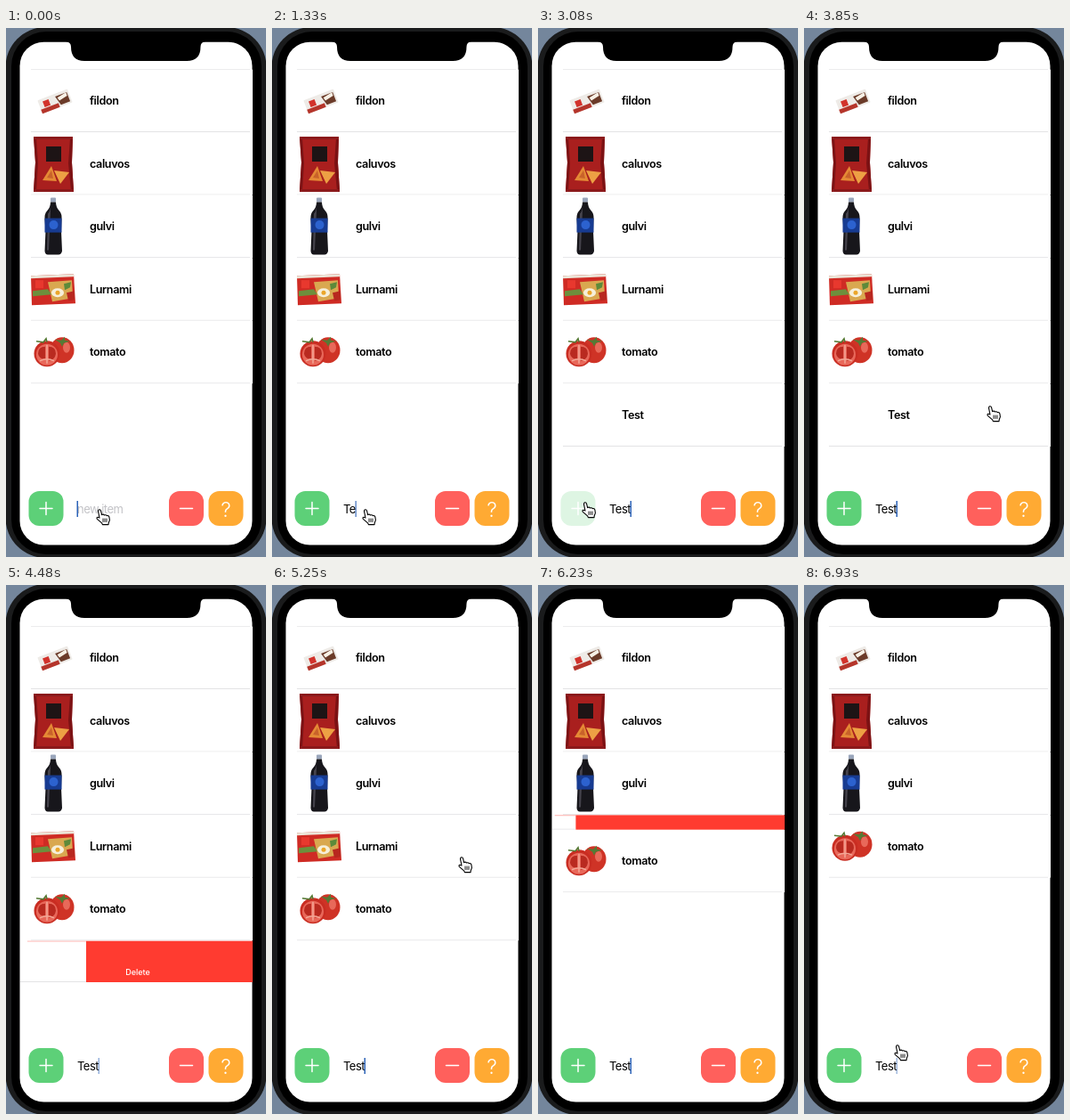
These frames come from a looping animation (292x594 px, 7000 ms). An HTML page:

```html
<!DOCTYPE html>
<html lang="en">
<head>
<meta charset="utf-8">
<title>Shopping list</title>
<style>
  html, body { margin: 0; width: 100%; height: 100%; overflow: hidden; background: #74869c; }
  svg { display: block; }
  text { font-family: Inter, "Liberation Sans", sans-serif; }
  .name { font-size: 12.6px; font-weight: 600; letter-spacing: -.03em; }
  .field { font-size: 13px; letter-spacing: -.04em; }
  .delete { font-size: 9px; font-weight: 500; fill: #fff; text-anchor: middle; }
  .icon { stroke: #fff; stroke-width: 1.5; stroke-linecap: round; fill: none; }
</style>
</head>
<body>
<svg id="stage" width="292" height="594" viewBox="0 0 292 594">
  <defs>
    <g id="bar" transform="translate(39 36) rotate(-21)">
      <rect x="-18" y="-8" width="36" height="16" rx="1" fill="#eeebe7"/>
      <path d="M-18 3H3V8H-18Z" fill="#b5352b"/>
      <path d="M2-5H16V6H5Z" fill="#6b3b29"/>
      <path d="M4-3 15-5V-1L5 1Z" fill="#f7f1e6"/>
      <rect x="-13" y="-5" width="7" height="7" fill="#d2322b"/>
    </g>
    <g id="bag">
      <path d="M15 5Q37 7 59 5L58 34 60 66Q37 68 15 66L17 34Z" fill="#a91f1e"/>
      <path d="M15 5 18 6 20 35 18 66 15 66 17 34ZM59 5 56 6 54 35 57 66 60 66 58 34Z" fill="#7c1214"/>
      <path d="M15 5H59V8H15ZM15 64H60V67H15Z" fill="#8b191b"/>
      <rect x="29" y="16" width="17" height="17" fill="#1d1415"/>
      <path d="M25 54 35 38 41 55Z" fill="#e58a35"/>
      <path d="M38 43 55 45 45 58Z" fill="#eda044"/>
      <path d="M30 51 35 43 37 52Z" fill="#c9622a"/>
    </g>
    <g id="bottle">
      <rect x="34" y="3" width="6" height="5" rx="1" fill="#9aa6bb"/>
      <path d="M34 8H40Q40 14 44 18 47 21 46.500 28L46 40 47 63Q46 67 43 67H31Q28 67 27.500 63L28.500 40 27.500 28Q27 21 30 18 34 14 34 8Z" fill="#17161b"/>
      <path d="M31 21Q34 18 34 12V18L32 62H30L30.500 42Z" fill="#45434c"/>
      <rect x="27.500" y="26" width="19" height="16" fill="#173b91"/>
      <circle cx="37.500" cy="33.500" r="5" fill="#2c62cf"/>
    </g>
    <g id="packet" transform="translate(-1 0)">
      <path d="M13 20 61 18 63 51 14 53Z" fill="#cf2b24"/>
      <path d="M13 20 61 18 61 21 13 23Z" fill="#ece5d8"/>
      <path d="M32 27 59 25 60 45 37 49Z" fill="#d9a850"/>
      <path d="M15 37 32 35 36 41 15 43Z" fill="#6d8f3c"/>
      <ellipse cx="43" cy="39" rx="7" ry="5" fill="#f6efd9"/>
      <circle cx="43" cy="39" r="2.500" fill="#eba62a"/>
      <path d="M50 29 58 27 57 33 51 36Z" fill="#5d8a3a"/>
      <path d="M53 39 62 37V47L55 48Z" fill="#b8271f"/>
      <rect x="18" y="25" width="9" height="9" fill="#e8382e"/>
    </g>
    <g id="tomato">
      <ellipse cx="47" cy="33" rx="13.500" ry="14.500" fill="#cf3326"/>
      <ellipse cx="52" cy="30" rx="4" ry="6" fill="#e8695a"/>
      <path d="M39 21 46 22 50 18 50 22 56 23 49 25 47 29 45 25Z" fill="#557a35"/>
      <ellipse cx="30" cy="37" rx="14.500" ry="14.500" fill="#c92d22"/>
      <ellipse cx="30" cy="38" rx="12" ry="12" fill="#e8685a"/>
      <path d="M28 29Q20 29 20 37 21 43 28 43ZM32 29Q40 29 40 37 39 44 32 45Z" fill="#b92a20"/>
      <path d="M30 27V48M22 45Q30 41 38 45" stroke="#f3a796" stroke-width="1.500" fill="none"/>
      <path d="M18 23 26 24 29 20 30 24" stroke="#557a35" stroke-width="1.600" fill="none"/>
    </g>
  </defs>

  <rect x="-.5" y="-1" width="293" height="596" rx="45" fill="#1a1b1c"/>
  <rect x="6" y="4" width="281" height="587" rx="39"/>
  <rect x="15.500" y="15.700" width="261" height="564.800" rx="27" fill="#fff"/>
  <path d="M67 15H224Q218.500 16 218.500 21 218.500 37 203 37H88Q73 37 73 21 73 16 67 15Z"/>
  <path d="M28 46.500H274" stroke="#e3e3e5"/>
  <g id="list"></g>

  <g id="add">
    <rect x="25.500" y="520" width="39" height="39" rx="12" fill="#5dd078"/>
    <path class="icon" d="M38 539.500H52M45 532.500V546.500"/>
  </g>
  <rect x="183" y="520" width="39" height="39" rx="12" fill="#ff605c"/>
  <path class="icon" d="M195.500 539.500H209.500"/>
  <rect x="227.500" y="520" width="39" height="39" rx="12" fill="#ffaa33"/>
  <text x="247" y="548.500" font-size="23" font-weight="300" fill="#fff" text-anchor="middle">?</text>

  <text id="hint" class="field" x="80" y="544.500" fill="#c3c3c7">new item</text>
  <text id="typed" class="field" x="80" y="544.500"></text>
  <rect id="caret" y="531" width="1.500" height="18" fill="#2b62b8"/>

  <g id="hand" stroke="#000" stroke-width="1.100" stroke-linejoin="round" stroke-linecap="round">
    <path fill="#fff" d="M4 10 2.600 3.200Q2.300 1 3.900.800 5.300.700 5.700 2.600L6.600 6.600Q8.600 5.600 9.400 7 11.400 6.200 12.200 7.600 14.400 7 14.900 9.200L15.400 12.600 14.200 15.800 14 17.600H7.400L6.600 15.800 1.400 11.400Q.400 9.800 1.800 9.200Z"/>
    <path d="M8 11V14.500M10 11V14.500M12 11V14.500" stroke-width=".9"/>
  </g>
</svg>

<script>
const LOOP = 7000, STEP = 70, TOP = 46.4, ROW = 70.6, WIDTH = 261, INSET = 12;
const BLINK = 1050, DRAG = 140, COLLAPSE = 350, RELEASED = 112;

const items = [
  { name: 'fildon', art: 'bar' },
  { name: 'caluvos', art: 'bag' },
  { name: 'gulvi', art: 'bottle' },
  { name: 'Lurnami', art: 'packet', swipe: 5850 },
  { name: 'tomato', art: 'tomato' },
  { name: 'Test', added: 3080, swipe: 4203 }
];
const keys = [280, 770, 1400, 1750];

// time, x, y
const path = [
  [0, 101, 540], [2310, 101, 540], [2870, 49, 532], [3150, 49, 532],
  [3780, 205, 424], [4200, 205, 424], [4460, -40, 426], [4690, -40, 380],
  [5250, 209, 305], [5600, 214, 300], [5880, 214, 300], [6120, -40, 302],
  [6440, -40, 360], [6930, 101, 516]
];

const $ = id => document.getElementById(id);
const clamp = v => Math.max(0, Math.min(1, v));
const ramp = (t, from, to) => clamp((t - from) / (to - from));
const ease = u => u * u * (3 - 2 * u);

for (const item of items) {
  $('list').insertAdjacentHTML('beforeend', `<svg x="16" width="${WIDTH}">
    <rect height="${ROW}" width="${WIDTH}" fill="#ff3b30"/>
    <text class="delete" y="39">Delete</text>
    <g><rect width="${WIDTH}" height="${ROW}" fill="#fff"/>
      ${item.art ? `<use href="#${item.art}"/>` : ''}
      <text class="name" x="78" y="39.500">${item.name}</text></g>
    <path stroke="#ff3b30" stroke-opacity=".5"/>
    <path stroke="#e3e3e5"/></svg>`);
  const view = $('list').lastChild;
  const [red, label, content, edge, line] = view.children;
  Object.assign(item, { view, red, label, content, edge, line });
}

function drawRow(item, t, y) {
  const start = item.swipe ?? LOOP;
  const drag = ramp(t, start, start + DRAG);
  const gone = ease(ramp(t, start + DRAG, start + DRAG + COLLAPSE));
  const shown = t >= (item.added ?? 0) && gone < 1;
  const height = shown ? ROW * (1 - gone) : 0;
  const left = WIDTH - (WIDTH - RELEASED) * drag - RELEASED * gone;

  item.view.style.display = shown ? '' : 'none';
  item.view.setAttribute('y', y);
  item.view.setAttribute('height', height);
  for (const part of [item.red, item.label, item.edge]) part.style.display = drag ? '' : 'none';
  item.red.setAttribute('x', left);
  item.label.setAttribute('x', left + Math.min(58, (WIDTH - left) / 2));
  item.content.setAttribute('transform', `translate(${left - WIDTH} 0)`);
  item.edge.setAttribute('d', `M${INSET * (1 - gone)} .5H${left}`);
  item.line.setAttribute('d', `M${drag ? 0 : INSET} ${height - .5}H${drag ? left : 258}`);
  return height;
}

function drawField(t) {
  const count = keys.filter(k => k <= t).length;
  const since = t - (keys[count - 1] ?? 0);
  const phase = since % BLINK / BLINK;
  const typed = $('typed');
  typed.textContent = 'Test'.slice(0, count);
  $('hint').style.display = count ? 'none' : '';
  $('caret').setAttribute('x', 79.5 + (count ? typed.getComputedTextLength() : 0));
  $('caret').setAttribute('opacity', 1 - ramp(phase, .45, .75) + ramp(phase, .88, 1));
}

function drawHand(t) {
  const i = Math.max(1, path.findIndex(p => p[0] >= t));
  const [t0, x0, y0] = path[i - 1], [t1, x1, y1] = path[i];
  const u = ease(ramp(t, t0, t1));
  $('hand').setAttribute('transform', `translate(${x0 + (x1 - x0) * u} ${y0 + (y1 - y0) * u})`);
}

function draw(now) {
  const t = Math.floor(now % LOOP / STEP) * STEP;
  let y = TOP;
  for (const item of items) y += drawRow(item, t, y);
  drawField(t);
  drawHand(t);
  const pressed = t >= 2940 ? 1 - ramp(t, 3080, 3360) : 0;
  $('add').setAttribute('opacity', 1 - .8 * pressed);
}

let origin;
function tick(now) {
  origin ??= now;
  draw(now - origin);
  requestAnimationFrame(tick);
}
draw(0);
requestAnimationFrame(tick);
</script>
</body>
</html>
```
